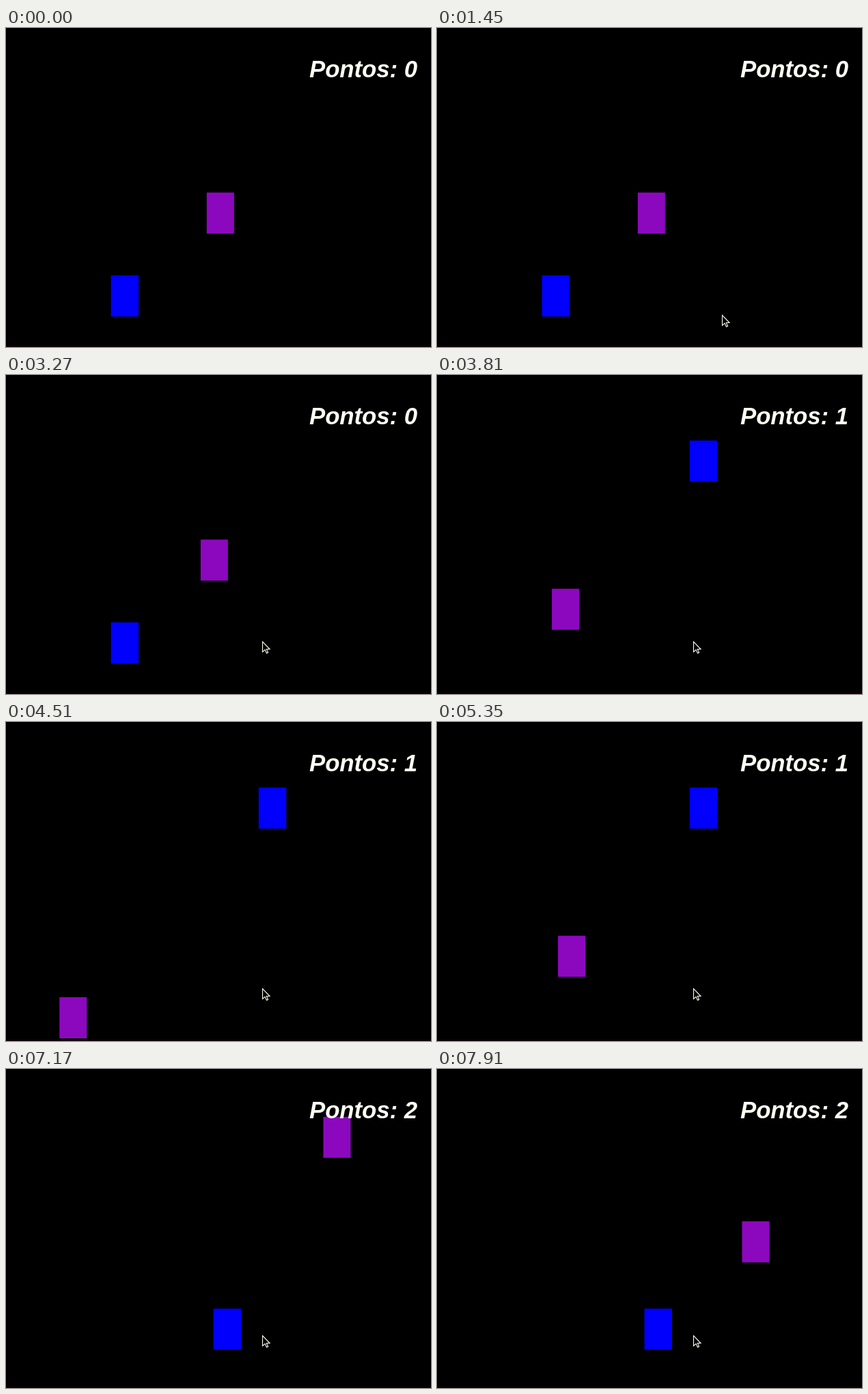
Animation of 622x466 px, one loop 8000 ms. Source, as an HTML page:

```html
<!DOCTYPE html>
<html lang="pt">
<head>
<meta charset="utf-8">
<title>Pontos</title>
<style>
  html, body { margin: 0; width: 100%; height: 100%; overflow: hidden; background: #000; }
  svg { display: block; width: 100%; height: 100%; }
  text { font: italic bold 34.7px "Liberation Sans", Arial, sans-serif; fill: #fffff4; }
</style>
</head>
<body>
<svg viewBox="0 0 622 466">
  <rect width="622" height="466" fill="#000"/>
  <rect y="463" width="622" height="3" fill="#0c0004"/>
  <rect id="goal" width="40.4" height="60" fill="#0000fc"/>
  <rect id="player" width="40" height="60" fill="#8c08be"/>
  <text id="score" x="444" y="72"></text>
  <path id="cursor" d="M.5 .5V15.5L4 12.3L6.5 17.5L8.5 16.5L6.3 11.5H11Z"
        fill="#000" stroke="#fffff0" stroke-width="1.1"/>
</svg>
<script>
const LOOP = 8000;
const STEP = 8.98, WIDTH = 40, HEIGHT = 60;
// The game ticks steadily, then pauses briefly at the end of each cycle.
const CYCLE = 840, CYCLE_TICKS = 20, TICK = 39;
const FIRST_TICK = 18;

// Keys held, each with a number of ticks; "-" is none.
const route = "R11 L17 LD14 -6 LD4 -5 R1 RU9 -4 RU24 R13 -4 LU4 LD2 D15";
const headings = { L: [-1, 0], R: [1, 0], U: [0, -1], D: [0, 1], "-": [0, 0] };
const spots = [[153.6, 361.4], [369.8, 95.7], [303.6, 350]];

const cursorStops = [
  [310, 456, 456], [470, 432, 434], [1010, 431, 433],
  [1750, 407, 409], [1990, 402, 406], [2150, 375, 389]
];

const $ = id => document.getElementById(id);
const place = (id, x, y) => $(id).setAttribute("transform", `translate(${x} ${y})`);

const touches = (x, y, [gx, gy]) =>
  Math.abs(x - gx) < WIDTH && Math.abs(y - gy) < HEIGHT;

// Plays the route once and keeps the state after every tick.
function play() {
  let x = 293.8, y = 240.4, points = 0;
  const states = [{ x, y, points }];
  for (const [, keys, count] of route.matchAll(/([LRUD-]+)(\d+)/g)) {
    for (let n = 0; n < count; n++) {
      for (const key of keys) {
        x += headings[key][0] * STEP;
        y += headings[key][1] * STEP;
      }
      if (touches(x, y, spots[points])) points++;
      states.push({ x, y, points });
    }
  }
  return states;
}

function tickAt(t) {
  const offset = t - 170;
  const cycle = Math.floor(offset / CYCLE);
  const phase = offset - cycle * CYCLE;
  return cycle * CYCLE_TICKS + Math.min(Math.floor(phase / TICK), CYCLE_TICKS - 1);
}

function cursorAt(t) {
  const i = cursorStops.findLastIndex(stop => stop[0] <= t);
  const a = cursorStops[i], b = cursorStops[i + 1] || a;
  const p = a === b ? 0 : (t - a[0]) / (b[0] - a[0]);
  return [1, 2].map(n => Math.round(a[n] + (b[n] - a[n]) * p));
}

const states = play();
// Tick at which the first key goes down.
const begin = tickAt(2690) - 9;

function draw(t) {
  const n = Math.max(0, Math.min(tickAt(t) - begin, states.length - 1));
  const { x, y, points } = states[n];
  place("player", x, y);
  place("goal", ...spots[points]);
  $("score").textContent = "Pontos: " + points;

  const shown = t >= cursorStops[0][0];
  $("cursor").style.display = shown ? "" : "none";
  if (shown) place("cursor", ...cursorAt(t));
}

const start = performance.now();
function frame() {
  draw((performance.now() - start) % LOOP);
  requestAnimationFrame(frame);
}
frame();
</script>
</body>
</html>
```
